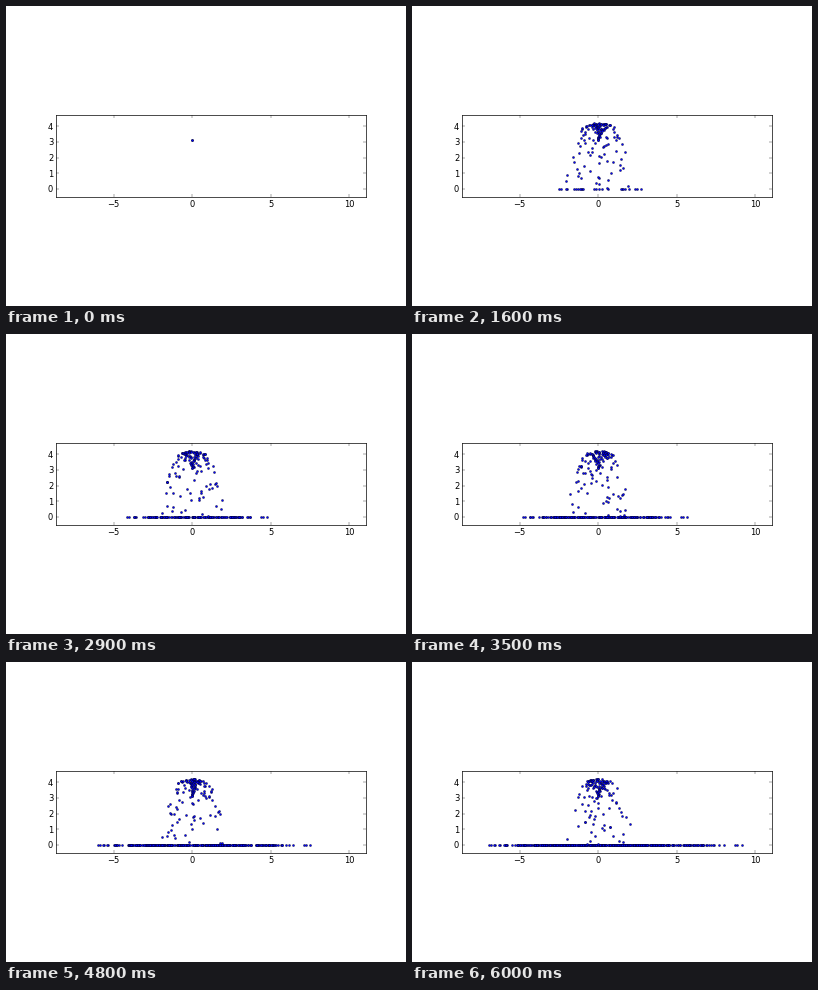
Write a matplotlib script that moves like this. It is 400 by 300 pixels and loops after 6.1 s.

```python
import matplotlib.pyplot as plt
import numpy as np
from matplotlib.animation import FuncAnimation

FRAMES, STEP_MS = 61, 100
RATE = 100  # particles per second
GRAVITY, NOZZLE = 9.8, 3.1
SPREAD = 0.39  # largest launch angle from the vertical

plt.rcParams.update({
    "font.family": "DejaVu Sans",
    "font.size": 12,
    "axes.linewidth": 1,
})

# Each particle has a birth time, a launch velocity and a sideways drag.
rng = np.random.default_rng(7)
count = FRAMES * RATE // 10
birth = np.arange(count) / RATE
angle = rng.uniform(-SPREAD, SPREAD, count)
angle[:2] = SPREAD, -SPREAD  # the first pair leads on both sides
speed = rng.normal(4.62, 0.02, count)
vx, vy = speed * np.sin(angle), speed * np.cos(angle)
drag = np.where(vx > 0, 0.05, 0.15)

fig = plt.figure(figsize=(8, 6), dpi=50, facecolor="white")
ax = fig.add_axes([50 / 400, 109 / 300, 310 / 400, 82 / 300])
ax.set_xlim(-8.66, 11.06)
ax.set_ylim(-0.51, 4.71)
ax.set_xticks([-5, 0, 5, 10])
ax.set_yticks(range(5))
ax.tick_params(direction="in", top=True, right=True,
               length=4, width=0.5, pad=4)
dots, = ax.plot([], [], ".", color="blue", markersize=6,
                markeredgecolor="black", markeredgewidth=0.5)


def draw(frame):
    now = frame * STEP_MS / 1000 + 0.01
    live = birth <= now + 1e-9
    age = now - birth[live]
    x = vx[live] * (1 - np.exp(-drag[live] * age)) / drag[live]
    y = NOZZLE + vy[live] * age - GRAVITY * age**2 / 2
    dots.set_data(x, np.maximum(y, 0))
    return dots,


anim = FuncAnimation(fig, draw, frames=FRAMES, interval=STEP_MS,
                     repeat=True, repeat_delay=0)
plt.show()
```
